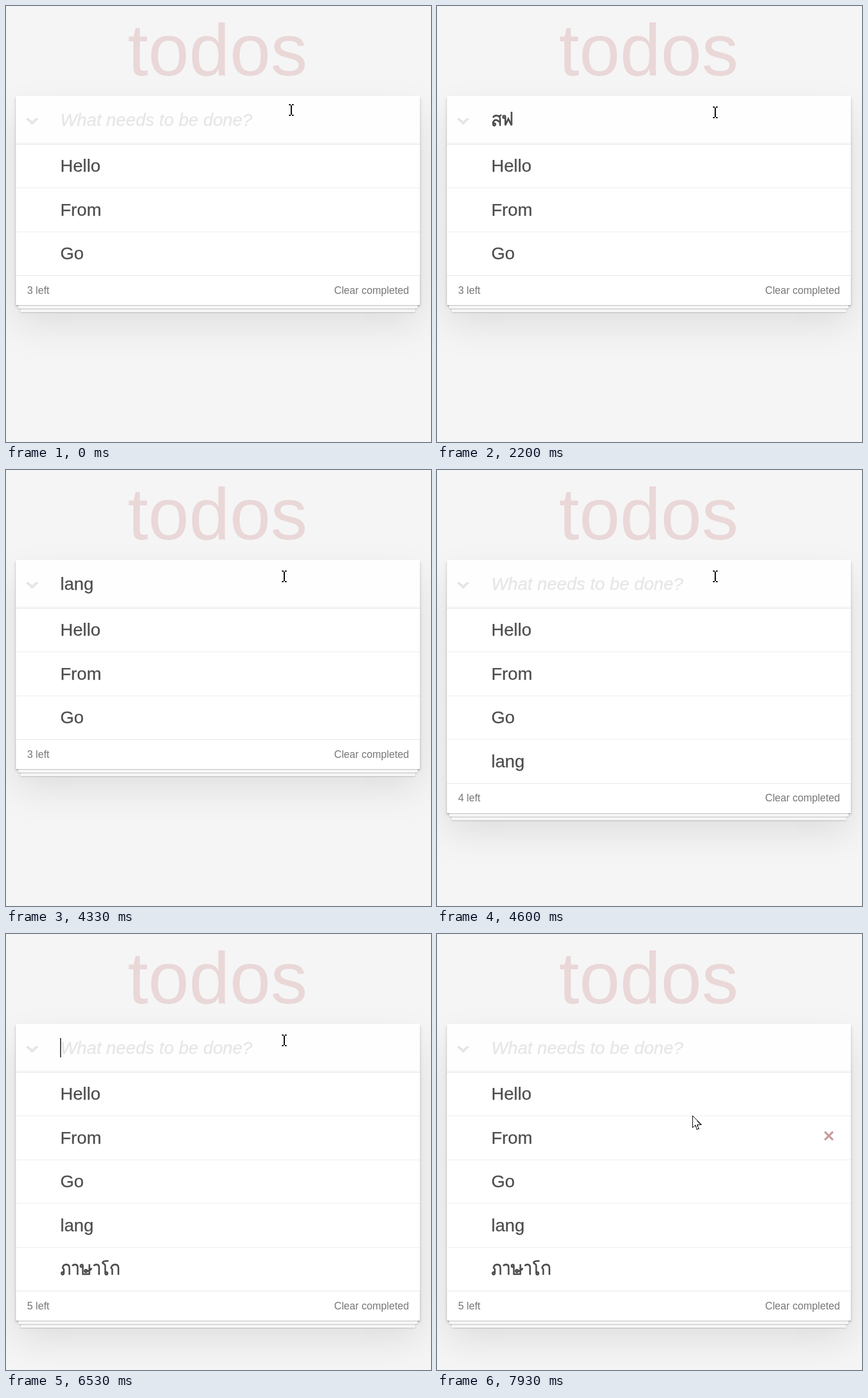
Write an HTML page that moves like this. It is 724 by 742 pixels and loops after 8000 ms.

```html
<!DOCTYPE html>
<html lang="en">
<head>
<meta charset="utf-8">
<title>todos</title>
<style>
html, body { margin: 0; width: 100%; height: 100%; overflow: hidden; background: #f5f5f5; }
#card, #stack, #input, svg { position: absolute; }
#card { left: 17px; top: 153px; width: 688px; background: #fff;
  box-shadow: 0 2.5px 5px rgba(0,0,0,.2), 0 31px 62px rgba(0,0,0,.1); }
#stack { left: 0; right: 0; bottom: 0; height: 50px;
  box-shadow: 0 1px 1px rgba(0,0,0,.2), 0 10px 0 -4px #f6f6f6, 0 11px 1px -4px rgba(0,0,0,.2),
    0 20px 0 -8px #f6f6f6, 0 21px 2px -8px rgba(0,0,0,.2); }
#input { left: 0; top: 0; width: 100%; height: 82px; background: #fefefe;
  box-shadow: inset 0 -2.5px 1.25px rgba(0,0,0,.03); }
svg { left: 0; top: 0; font: 30px "Liberation Sans", Arial, sans-serif; fill: #4d4d4d; }
.title { font-size: 125px; fill: rgba(175,47,47,.15); text-anchor: middle; }
.hint { font-style: italic; fill: #e6e6e6; stroke: #e6e6e6; stroke-width: .4; }
.small { font-size: 17.5px; fill: #777; }
.thai { fill: none; stroke: #4d4d4d; stroke-width: 2.8; }
.cross { stroke: #cc9a9a; stroke-width: 3.4; }
</style>
</head>
<body>
<div id="card"><div id="stack"></div><div id="input"></div></div>
<svg width="724" height="742">
  <text class="title" x="360.5" y="118">todos</text>
  <path d="M34 192.5l3-2.5 7.5 6 7.5-6 3 2.5-10.5 10z" fill="#e6e6e6"/>
  <g id="live"></g>
</svg>
<script>
const LOOP = 8000, BLINK = 510, ROW = 74.5, LEFT = 92;
const card = document.getElementById('card'), live = document.getElementById('live');

// Thai letters: advance width and pen strokes on a baseline at 0
const ring = (x, y, dir = -1) => `M${x} ${y}a2 2 0 1 0 ${4 * dir} 0a2 2 0 1 0 ${-4 * dir} 0`;
const arch = 'V-9.5l-2-2.5Q4.5-17.5 9.5-17.5Q15-17.5 15-11.5V0';
const thai = {
  'ก': [18.5, 'M4.5 0' + arch],
  'ภ': [18, ring(5.5, -2.5) + arch],
  'า': [14.5, 'M2-15Q3.5-17.5 6.5-17.5Q11-17.5 11-12.5V0'],
  'ษ': [22, ring(5.4, -15.3) + 'V-1.2H16.5V-18' + ring(12.5, -6.5) + 'Q18-6.5 20.5-11.5'],
  'โ': [14.5, 'M12.5-23.5C3-24 0-20.5 5-18.5Q7-17.5 7-15V-2.5' + ring(7, -2.5, 1)],
  'ส': [18, ring(6.5, -2.5) + 'M2.5-2.5V-6Q6-14 14-6M2.5-14Q4-17.5 8-17.5Q14.5-17.5 14.5-11V0M12.5-15l4-4'],
  'ฟ': [21, ring(5.4, -15.3) + 'V-1L10.5-12L16-1V-24'],
  'ื': [0, 'M-18-20Q-12.5-27-7-20zM-10-22v-4M-7-20v-6'],
  'เ': [11, 'M4-17.5V-2.5' + ring(4, -2.5, 1)]
};
const advance = c => thai[c] ? thai[c][0] : c === 'l' ? 6.67 : 16.68;
const width = s => [...s].reduce((w, c) => w + advance(c), 0);

// Each word is typed at an even pace, then erased key by key or entered as an item
const todos = ['Hello', 'From', 'Go'];
const words = [
  { text: 'สฟืเ', from: 1200, to: 1670, erase: 2000, end: 2470 },
  { text: 'lang', from: 3270, to: 3800, end: 4600 },
  { text: 'ภาษาโก', from: 5270, to: 6330, end: 6530 }
];
const FIRST_BLINK = -620;

// Pointer key points: time, x, y
const path = [[70, 486, 177], [330, 479, 171], [670, 474, 181], [7000, 474, 181], [7200, 445, 181],
  [7400, 445, 181], [7730, 451, 341], [7800, 451, 341], [7930, 435, 309]];

function pointerAt(t) {
  const i = path.findIndex(p => p[0] > t);
  if (i < 1) return (i ? path[path.length - 1] : path[0]).slice(1);
  const a = path[i - 1], b = path[i], k = (t - a[0]) / (b[0] - a[0]);
  return [1, 2].map(j => Math.round(a[j] + (b[j] - a[j]) * k));
}

// Keys struck by time t when n keys are spread evenly from one time to another
const struck = (t, from, to, n) =>
  t < from ? 0 : Math.min(n, 1 + Math.floor((t - from) / (to - from) * (n - 1)));

function stateAt(t) {
  const word = words.filter(w => t >= w.from).pop();
  const items = todos.concat(words.filter(w => !w.erase && t >= w.end).map(w => w.text));
  if (!word) return { typed: '', items, caret: blink(t - FIRST_BLINK) };
  const { text, from, to, erase, end } = word, n = text.length;
  const gone = erase ? struck(t, erase, end, n) : t >= end ? n : 0;
  const typed = text.slice(0, struck(t, from, to, n) - gone);
  return { typed, items, caret: t < to || blink(t - to) };
}
const blink = age => Math.floor(age / BLINK) % 2 === 0;

const label = (s, x, y, attrs = '') => `<text x="${x}" y="${y}" ${attrs}>${s}</text>`;
const rect = (x, y, w, h, fill) => `<rect x="${x}" y="${y}" width="${w}" height="${h}" fill="${fill}"/>`;

function line(s, y) {
  if (!thai[s[0]]) return label(s, LEFT + .5, y, 'stroke="#4d4d4d" stroke-width=".25"');
  let x = LEFT + 1, out = '';
  for (const c of s) {
    out += `<path class="thai" transform="translate(${x} ${y})" d="${thai[c][1]}"/>`;
    x += advance(c);
  }
  return out;
}

function pointer(x, y) {
  const shape = y > 235
    ? '<path d="M.5.5V20.5l4.5-4.5 3 7.5 3-1.2-3-7.3h6.5z" fill="#fff" stroke="#000"/>'
    : '<path d="M-4-9h3M1-9h3M-4 9h3M1 9h3M0-8V8" stroke="#000" stroke-width="2"/>';
  return `<g transform="translate(${x} ${y})" shape-rendering="crispEdges">${shape}</g>`;
}

function draw(t) {
  const { typed, items, caret } = stateAt(t), [mx, my] = pointerAt(t), n = items.length;
  const bottom = 285.5 + ROW * n;
  const hover = Math.floor((my - 234.5) / ROW);
  card.style.height = Math.round(bottom) - 153 + 'px';

  let out = rect(17, 235, 688, 1, '#e6e6e6');
  out += typed ? line(typed, 204) : label('What needs to be done?', LEFT + .5, 204, 'class="hint"');
  items.forEach((item, i) => {
    const y = Math.round(282 + ROW * i);
    out += line(item, y) + rect(17, y + 27, 688, 1, i === n - 1 ? '#e6e6e6' : '#ededed');
    if (i === hover) out += `<path class="cross" d="M660.5 ${y - 20.5}l14 14m0-14l-14 14"/>`;
  });
  const base = Math.floor(bottom - 19);
  out += label(n + ' left', 36, base, 'class="small"');
  out += label('Clear completed', 686.5, base, 'class="small" text-anchor="end"');
  if (caret) out += rect(Math.floor(LEFT + width(typed)), 177, 2, 33, '#4d4d4d');
  live.innerHTML = out + pointer(mx, my);
}

const start = performance.now();
function tick() {
  draw((performance.now() - start) % LOOP);
  requestAnimationFrame(tick);
}
tick();
</script>
</body>
</html>
```
